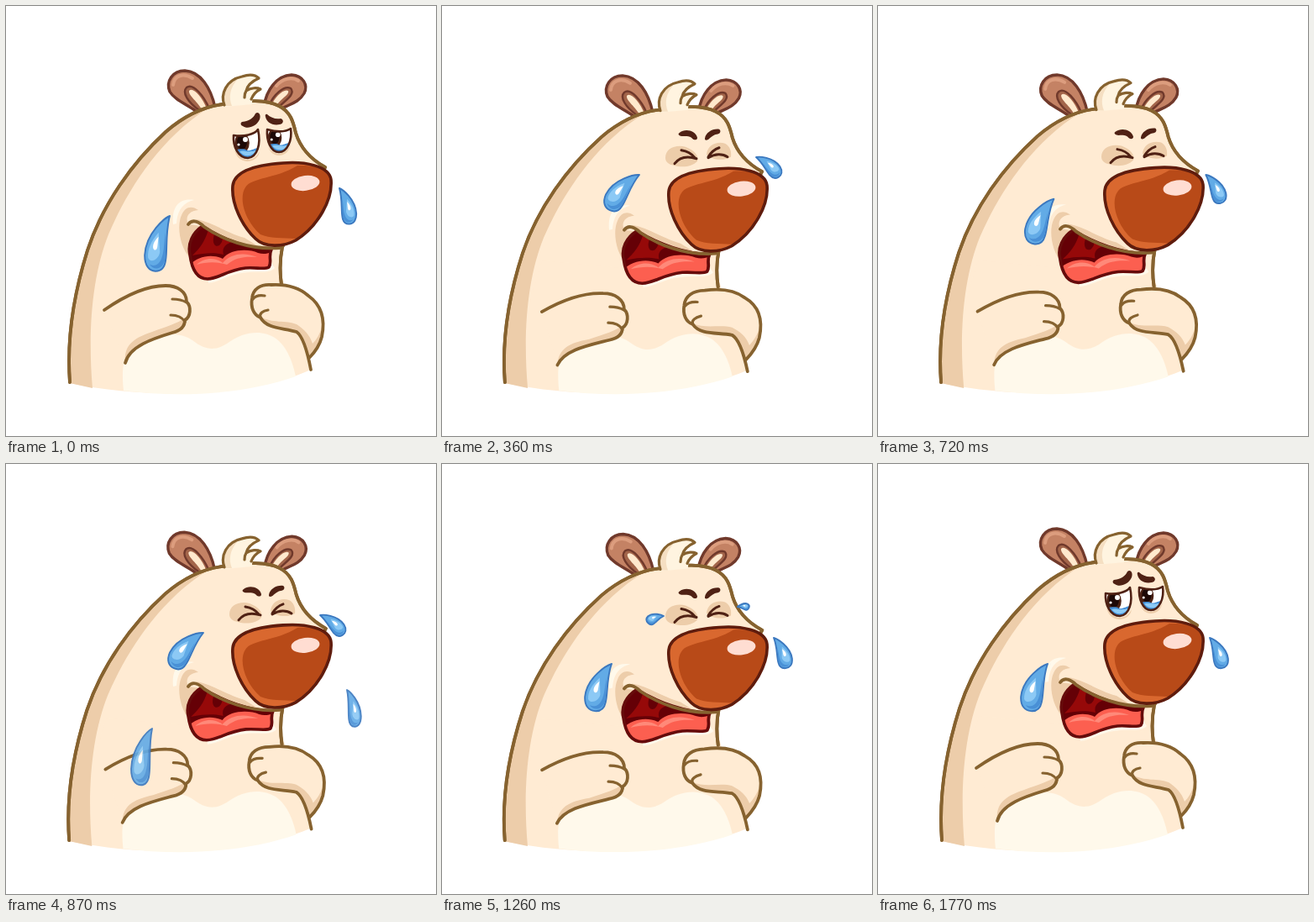
An HTML page that plays this animation: 512x512 px, repeating every 1.8 s.

```html
<!DOCTYPE html>
<html lang="en">
<head>
<meta charset="utf-8">
<title>Crying bear</title>
<style>
html, body { margin: 0; width: 100%; height: 100%; overflow: hidden; background: #fff; }
svg { display: block; width: 100vw; height: 100vh; }
path { stroke-linecap: round; stroke-linejoin: round; }
.skin { fill: #ffebd3; }
.shade { fill: #edcdaa; }
.pale { fill: #fff9eb; }
.line { fill: none; stroke: #86622f; stroke-width: 3.8; }
.thin { fill: none; stroke: #86622f; stroke-width: 3.2; }
.outer { fill: #c48264; stroke: #70392b; stroke-width: 3.4; }
.glow { fill: none; stroke: #dc9d7e; stroke-width: 4; }
.inner { fill: #a3654a; stroke: #70392b; stroke-width: 2.4; }
.lobe { fill: #ffe9cd; }
.brow { fill: #4f2114; }
.lid { fill: none; stroke: #4f2114; stroke-width: 3; }
.rim { stroke-width: 2.6; }
.mouth { fill: none; stroke: #660b0b; stroke-width: 3.6; }
.nose { fill: none; stroke: #5f1c0d; stroke-width: 3.6; }
.edge { stroke: #3b78bf; stroke-width: 1.9; vector-effect: non-scaling-stroke; }
</style>
</head>
<body>
<svg viewBox="0 0 512 512">
  <defs>
    <g id="drop">
      <path class="edge" fill="#62abe6" d="M0 0C-5 2-28 20-29 47C-29 60-23 66-16 66C-9 66-5 62-4 53C-2 40-5 20 0 0Z"/>
      <path fill="#8cc9f5" d="M-13 20C-22 31-26 40-25 50C-23 57-12 53-11 43Z"/>
      <path fill="#4990d6" d="M-4 16C-7 30-5 40-9 51C-12 59-18 61-23 58C-18 66-8 64-5 53C-3 40-6 26-4 16Z"/>
      <path fill="#fff" d="M-13 25C-18 30-20 35-19 39C-17 43-14 40-14 36Z"/>
    </g>
    <path id="lips" d="M316 290C312 298 317 305 313 311C308 314 298 311 285 312C262 315 255 324 240 325C226 325 221 312 219 296C216 283 222 270 234 262C258 278 290 290 316 290"/>
    <path id="snout" d="M270 214C272 196 300 189 330 187C355 185 385 190 387 207C389 230 372 262 345 279C330 287 308 288 297 277C281 262 268 235 270 214Z"/>
    <path id="rimL" d="M271 154C270 168 277 181 288 181C299 180 304 165 300 147C296 153 283 156 271 154Z"/>
    <path id="rimR" d="M311 147C310 160 315 174 325 174C335 174 341 160 339 146C333 150 322 150 311 147Z"/>
    <path id="armL" class="limb" d="M117 362C140 346 165 333 190 333C204 333 215 340 215 352C221 358 220 370 213 374C213 383 206 387 198 389C175 396 147 405 142 425"/>
    <path id="armR" class="limb" d="M363 433C359 412 353 393 346 388C330 383 311 385 303 371C295 368 291 359 293 348C294 337 303 331 316 332C335 331 350 336 360 345C377 357 380 375 376 394C373 406 367 413 361 419"/>
    <clipPath id="inMouth"><use href="#lips"/></clipPath>
    <clipPath id="inL"><use href="#rimL"/></clipPath>
    <clipPath id="inR"><use href="#rimR"/></clipPath>
    <g id="ball">
      <path fill="#fff" d="M-20-25H25V25H-20Z"/>
      <ellipse rx="8.800" ry="12" fill="#4a2114"/>
      <ellipse cy="-1" rx="6" ry="9" fill="#1d0907"/>
      <circle cx="4" cy="-4" r="3" fill="#fff"/>
      <circle cx="-4" cy="2" r="1.600" fill="#fff"/>
      <path fill="#438fd7" d="M-13 7C-5 10 0 5 6 9C12 10 16 5 23 6V23H-13Z"/>
      <path fill="#8ccaf5" d="M-3 10C3 8 6 12 17 9C13 16 3 18-3 10Z"/>
    </g>
  </defs>

  <g id="earL">
    <path class="outer" d="M249 121C244 98 232 78 213 77C198 77 190 90 195 102C201 112 215 117 226 125"/>
    <path class="glow" d="M199 94C200 83 211 79 222 86"/>
    <path class="inner" d="M230 124C217 115 209 103 215 97C223 91 236 108 242 122"/>
    <path class="lobe" d="M234 125C229 114 217 107 218 101C222 96 233 107 239 122Z"/>
  </g>
  <g id="earR">
    <path class="outer" d="M307 120C310 100 322 83 340 82C354 83 360 94 355 104C348 116 336 117 329 122"/>
    <path class="glow" d="M322 95C329 86 341 84 348 89"/>
    <path class="inner" d="M313 119C318 106 331 94 339 98C345 105 333 112 325 120"/>
    <path class="lobe" d="M315 120C320 108 331 98 336 101C338 106 326 110 321 121Z"/>
  </g>

  <g id="torso">
    <path id="back" class="skin" d="M76 448C72 395 80 345 97 291C115 236 150 187 190 150C213 130 235 120 258 117C285 111 312 112 325 119C339 126 342 138 345 151C351 171 364 183 380 192L329 287C326 302 326 318 328 332"/>
    <path class="skin" d="M76 449L120 300L328 320L347 388C355 400 360 420 363 433C300 462 180 471 76 449Z"/>
    <path class="shade" d="M76 449C72 395 80 345 97 291C115 236 150 187 190 150C208 135 225 126 240 122C180 160 142 225 122 272C103 320 97 385 103 455Z"/>
    <path class="pale" d="M140 458C136 420 143 405 170 399C195 388 209 390 222 398C237 410 249 411 263 402C284 386 306 386 320 395C335 405 342 426 345 441C285 462 210 467 140 458Z"/>
    <use href="#spine" class="line"/>
    <path id="spine" class="line" d=""/>
  </g>

  <g id="head">
    <path fill="#fff4e0" d="M260 120C255 105 262 88 281 84C290 81 297 82 301 86C292 90 287 96 286 101C292 97 299 97 303 99C295 103 293 109 293 117Z"/>
    <path class="shade" opacity=".55" d="M260 119C256 105 263 91 276 87C266 98 265 109 269 119Z"/>
    <path class="thin" d="M260 118C255 105 262 88 281 84C290 81 297 82 301 86C292 90 287 96 286 101C292 97 299 97 303 99C297 102 294 106 292 111M286 101C284 104 284 107 284 109"/>

    <path class="pale" d="M199 260C197 242 204 228 224 231C211 234 204 243 203 259Z"/>
    <path class="shade" d="M219 300C207 287 203 262 209 249C213 239 221 237 229 243C217 244 213 252 217 260L232 262C221 271 216 284 219 300Z"/>
    <path class="shade" d="M226 254C246 257 257 268 284 276L305 289C273 285 250 270 235 262Z"/>
    <g id="mouth">
      <path class="pale" d="M241 330C259 327 265 319 288 317C302 316 313 319 320 312L314 303L240 318Z"/>
      <g clip-path="url(#inMouth)">
        <path fill="#650006" d="M210 255H325V335H210Z"/>
        <path fill="#960909" d="M241 266C237 281 230 289 222 297C240 293 251 294 259 296C256 286 265 280 275 281L257 271Z"/>
        <path fill="#650006" d="M248 272C245 281 248 288 254 285C259 280 258 276 256 274Z"/>
        <path fill="#fc5f50" d="M218 309C229 297 246 295 258 301C267 289 289 289 300 294C309 297 316 293 321 290V335H218Z"/>
        <path fill="#ff8979" d="M227 308C236 299 250 299 258 306C268 294 284 293 299 299C282 298 273 300 263 308C250 304 238 305 227 308Z"/>
      </g>
      <use href="#lips" class="mouth"/>
    </g>
    <path class="line" d="M217 260C222 253 230 257 236 263C256 277 290 291 326 288"/>

    <use href="#snout" fill="#d9682f"/>
    <path fill="#b84a18" d="M303 272C286 258 276 230 285 216C292 204 321 206 347 190C369 189 386 194 386 209C388 230 371 260 345 277C329 276 314 277 303 272Z"/>
    <ellipse cx="356.500" cy="211" rx="17" ry="9" fill="#ffddd2" transform="rotate(-7 356 211)"/>
    <use href="#snout" class="nose"/>

    <g id="open">
      <path class="shade" d="M272 171C280 186 295 187 302 173C301 181 294 185 287 185C279 184 274 180 272 171ZM312 167C318 179 333 179 339 165C337 174 331 178 325 178C319 178 314 174 312 167Z"/>
      <g clip-path="url(#inL)"><use href="#ball" x="281" y="163"/></g>
      <g clip-path="url(#inR)"><use href="#ball" transform="translate(320 157) scale(.94)"/></g>
      <use href="#rimL" class="lid rim"/>
      <use href="#rimR" class="lid rim"/>
      <path class="brow" d="M281 138C290 137 295 133 297 128C301 125 304 130 302 135C298 144 287 147 282 143C279 142 279 139 281 138ZM311 129C315 133 321 135 327 134C331 135 331 140 326 141C317 143 310 138 309 132C308 129 310 128 311 129Z"/>
    </g>
    <g id="shut">
      <path class="shade" d="M266 174C266 163 278 158 290 161C301 165 306 172 304 178C298 185 285 186 276 183C270 182 266 179 266 174ZM315 170C316 159 327 154 337 157C343 160 345 167 344 173C336 178 321 177 315 170Z"/>
      <path class="lid" d="M277 181C283 173 293 172 303 175M285 165C292 166 298 170 301 174M317 174C325 169 334 169 340 173M330 162C324 164 320 168 317 173"/>
      <path class="brow" d="M283 144C289 139 302 141 304 150C304 154 299 153 297 150C292 147 287 149 284 148C281 147 281 145 283 144ZM313 151C314 144 322 139 330 140C333 142 331 146 327 146C321 147 319 152 315 153C313 153 313 152 313 151Z"/>
    </g>
  </g>

  <use href="#armL" class="skin"/>
  <path class="shade limb" d="M142 425C140 405 150 396 174 388C192 381 205 378 213 371C214 383 206 387 198 389C175 396 147 405 142 425Z"/>
  <use href="#armL" class="line"/>
  <path class="thin limb" d="M198 349C204 349 210 350 215 353M196 368C205 368 210 371 213 376"/>
  <use href="#armR" class="skin"/>
  <path class="shade limb" d="M303 370C316 378 334 374 346 379C355 385 362 392 365 402C370 397 374 390 376 382C377 401 369 412 361 419C357 404 352 393 346 388C330 383 311 385 303 370Z"/>
  <use href="#armR" class="line"/>
  <path class="thin limb" d="M294 349C297 345 302 344 308 345M303 371C301 366 306 363 312 362"/>
  <g id="tears"></g>
</svg>
<script>
const $ = id => document.getElementById(id);
const LOOP = 1800, STEP = 30;

const limbs = [...document.querySelectorAll('.limb')].map(el => ({ el, d: el.getAttribute('d') }));
$('spine').setAttribute('d', $('back').getAttribute('d'));

const clamp = f => Math.min(1, Math.max(0, f));
const ease = f => (1 - Math.cos(Math.PI * f)) / 2;

// Value list at x, from rows of [x, ...values].
function track(rows, x, curve = f => f) {
  let i = 1;
  while (i < rows.length - 1 && x > rows[i][0]) i++;
  const a = rows[i - 1], b = rows[i];
  const f = curve(clamp((x - a[0]) / (b[0] - a[0])));
  return a.slice(1).map((v, k) => v + (b[k + 1] - v) * f);
}

// Arms sink with the body while shoulders and elbows stay near their place.
function bend(x, y, p) {
  if (x < 250) {
    const low = clamp((y - 385) / 40);
    return [x + p * (2 - 7 * low), y + p * 10 * clamp((x - 100) / 75) * (1 - .5 * low)];
  }
  const reach = clamp((375 - x) / 75);
  return [x + p * (2 - 7 * reach), y + p * (1 + 8 * reach)];
}

// Step, squash of the body, ear lean.
const squash = [[0, 0, 0], [5, -1.5, -1], [12, .92, 2], [15.5, 1, 2], [29, .67, -.6], [42, 1.02, 2.8], [55, 0, 0], [60, 0, 0]];

// Age, left tip x and y, right tip x and y, turn, width, length.
const fall = [
  [-.6, 268, 179, 349, 169, 46, 0, 0],
  [0, 264, 181, 352, 170, 46, .44, .29],
  [.5, 260, 184, 355, 171, 42, .56, .38],
  [2.5, 245, 192, 366, 175, 32, .86, .73],
  [4, 235, 201, 374, 180, 24, .93, .8],
  [8.5, 202, 238, 395, 207, 4, 1, .87],
  [9.5, 195, 250, 397, 217, 1, 1, 1],
  [11, 186, 268, 402, 232, 0, .97, 1.19],
  [12.5, 174, 315, 406, 269, 0, .86, 1.02],
  [15.5, 166, 394, 411, 333, 0, .6, .7]
];

const drops = [];
for (let k = 0; k < 6; k++) {
  for (const right of [false, true]) {
    const el = document.createElementNS('http://www.w3.org/2000/svg', 'use');
    el.setAttribute('href', '#drop');
    $('tears').append(el);
    drops.push({ el, right, birth: 8 + 8.5 * k });
  }
}

function drawDrop({ el, right, birth }, t) {
  const age = (t - birth + 61) % 60 - 1;
  const shown = age > -.6 && age < 15.5;
  el.style.display = shown ? '' : 'none';
  if (!shown) return;
  const [lx, ly, rx, ry, turn, w, h] = track(fall, age);
  el.setAttribute('transform', right
    ? `translate(${rx} ${ry}) rotate(${-1.35 * turn}) scale(${-.67 * w} ${.65 * h})`
    : `translate(${lx} ${ly}) rotate(${turn}) scale(${w} ${h})`);
  el.setAttribute('opacity', clamp((15.5 - age) / 3.3));
}

function draw(t) {
  const [p, lean] = track(squash, t, ease);
  const move = (id, v) => $(id).setAttribute('transform', v);
  move('torso', `translate(230 455) scale(${1 + .008 * p} ${1 - .0215 * p}) translate(-230 -455)`);
  move('head', `translate(0 ${7.3 * p})`);
  move('mouth', `translate(267 ${262 - p}) scale(${1 + .06 * p} ${1 - .01 * p}) translate(-267 -262)`);
  move('earL', `translate(${lean} ${6.4 * p})`);
  move('earR', `translate(${-lean * .8} ${6.4 * p})`);
  for (const { el, d } of limbs) {
    el.setAttribute('d', d.replace(/(\d+) (\d+)/g, (_, x, y) =>
      bend(+x, +y, p).map(v => v.toFixed(2)).join(' ')));
  }
  const crying = t >= 4 && t < 56;
  $('shut').style.display = crying ? '' : 'none';
  $('open').style.display = crying ? 'none' : '';
  for (const drop of drops) drawDrop(drop, t);
}

const start = performance.now();
function tick() {
  draw(Math.floor((performance.now() - start) % LOOP / STEP));
  requestAnimationFrame(tick);
}
tick();
</script>
</body>
</html>
```
